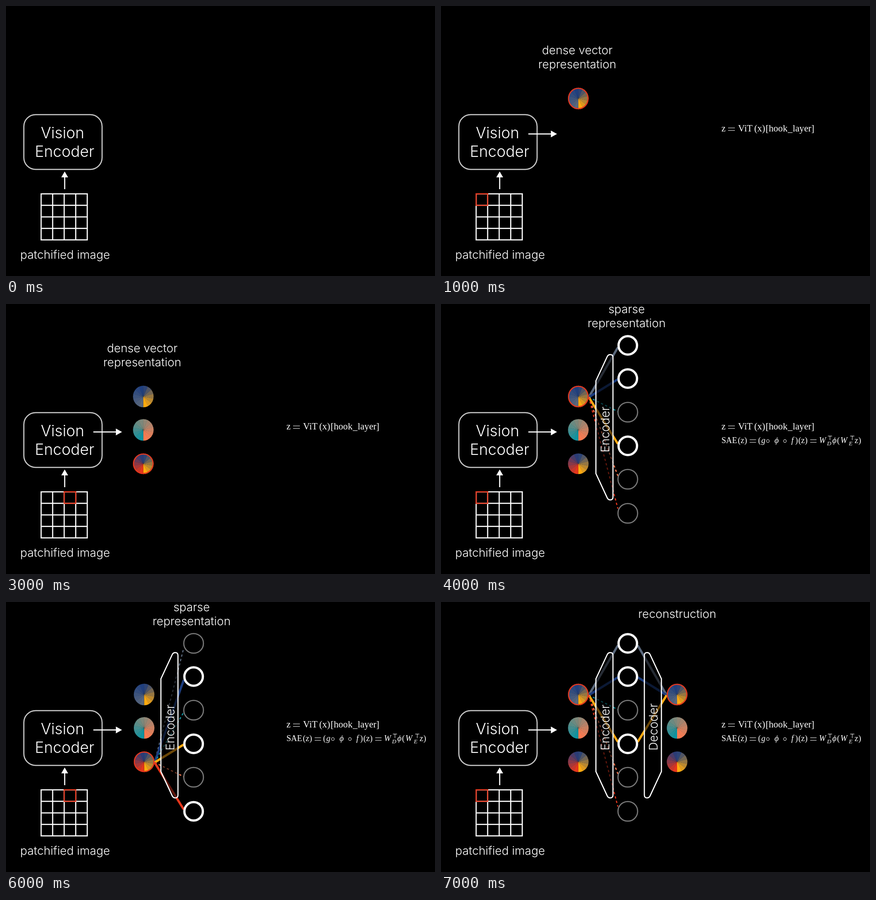
Recreate the animation shown at these times as an HTML page. Size 943 by 594 pixels, loop 8 s.

```html
<!DOCTYPE html>
<html lang="en">
<head>
<meta charset="utf-8">
<title>Sparse autoencoder on vision features</title>
<style>
  html, body { margin: 0; width: 100%; height: 100%; overflow: hidden; background: #000; }
  svg { display: block; width: 100vw; height: 100vh; }
  text { fill: #fff; font-family: Inter, sans-serif; font-weight: 300; font-size: 25.6px;
         font-optical-sizing: none; text-anchor: middle; }
  .big { font-size: 33.7px; }
  .side { font-size: 26px; }
  .math text { font-family: "Liberation Serif", serif; font-weight: 400; text-anchor: start; }
  .math .l1 { font-size: 20.6px; }
  .math .l2 { font-size: 18.2px; }
  .math .sub { font-size: 13px; }
  .math .it { font-style: italic; }
  .line { fill: none; stroke: #fff; stroke-width: 2.5; }
</style>
</head>
<body>
<svg id="stage" viewBox="0 0 943 594" xmlns="http://www.w3.org/2000/svg"></svg>
<script>
const STEP = 1000, COUNT = 8;
const SLATE = [90, 104, 124], BLUE = [27, 60, 126], TEAL = [15, 147, 160],
      GOLD = [255, 170, 15], CORAL = [255, 123, 80], RED = [229, 54, 28];
const rgb = c => `rgb(${c.map(Math.round)})`;

const features = [SLATE, BLUE, TEAL, GOLD, CORAL, RED];
const nodeY = [91, 164, 238, 312, 385.5, 460.5];
const tokens = [
  { y: 203.5, ry: 23.8, stops: [GOLD, BLUE, SLATE], on: [0, 1, 3] },
  { y: 277, ry: 23.8, stops: [CORAL, TEAL], on: [2, 4] },
  { y: 351.5, ry: 22.7, stops: [GOLD, BLUE, RED], on: [1, 3, 5] }
];
const TOKEN_X = 301.8, NODE_X = 410.6, OUT_X = 519, RX = 22.7, WEDGES = 14;

const label = (s, x, y, cls = '') => `<text class="${cls}" x="${x}" y="${y}">${s}</text>`;
const path = (d, extra = '') => `<path class="line" d="${d}" ${extra}/>`;

function mix(stops, u) {
  const p = u * (stops.length - 1), i = Math.min(Math.floor(p), stops.length - 2);
  return rgb(stops[i].map((a, k) => a + (stops[i + 1][k] - a) * (p - i)));
}

// Angular gradient in flat wedges, from the bottom up the right side.
function disc(x, t, ringed) {
  const at = a => `${x + RX * Math.sin(a)} ${t.y + t.ry * Math.cos(a)}`;
  let out = '';
  for (let i = 0; i < WEDGES; i++) {
    const a = i / WEDGES * 2 * Math.PI;
    const b = Math.min((i + 1.06) / WEDGES, 1) * 2 * Math.PI;
    out += `<path fill="${mix(t.stops, i / (WEDGES - 1))}" d="M${x} ${t.y}L${at(a)}A${RX} ${t.ry} 0 0 0 ${at(b)}Z"/>`;
  }
  if (ringed) out += `<ellipse cx="${x}" cy="${t.y}" rx="${RX - 1.2}" ry="${t.ry - 1.2}" fill="none" stroke="${rgb(RED)}" stroke-width="2.5"/>`;
  return out;
}

const discs = (x, sel, n = 3) => tokens.slice(0, n).map((t, i) => disc(x, t, i === sel)).join('');

// side = 1 links tokens to nodes, side = -1 links nodes to outputs.
function links(x, nx, sel, side) {
  const t = tokens[sel], y = t.y + 1.5;
  return features.map((c, i) => {
    const on = t.on.includes(i);
    if (!on && side < 0) return '';
    const ny = nodeY[i] + (y - nodeY[i]) * .04;
    const style = on ? 'stroke-width="5"' : 'stroke-width="2.5" stroke-dasharray="5 5"';
    return `<path d="M${x + 23 * side} ${y}L${nx - 21.8 * side} ${ny}" stroke="${rgb(c)}" ${style}/>`;
  }).join('');
}

const nodes = (x, sel) => nodeY.map((y, i) => {
  const on = tokens[sel].on.includes(i);
  return `<circle cx="${x}" cy="${y}" r="${on ? 20.3 : 21.6}" fill="#000" stroke="${on ? '#fff' : '#7a7a7a'}" stroke-width="${on ? 5 : 2.5}"/>`;
}).join('');

const FUNNEL = 'M340.5 169L365.8 114.8Q368 111.2 372 111.2Q378 111.2 378 117.5V424.5Q378 431 372 431Q368 431 365.8 427.4L340.5 373Z';
const funnel = (name, x, flip) =>
  path(FUNNEL, `style="fill:rgba(0,0,0,.58)" ${flip ? 'transform="matrix(-1 0 0 1 825 0)"' : ''}`) +
  `<text class="side" transform="translate(${x} ${flip ? 274.8 : 276}) rotate(-90)">${name}</text>`;

const cell = 25.35, gx = 77.2, gy = 413.2;
function grid(sel) {
  let d = '';
  for (let i = 0; i < 5; i++) {
    d += `M${gx + i * cell} ${gy - 1.2}v${4 * cell + 2.4}M${gx - 1.2} ${gy + i * cell}h${4 * cell + 2.4}`;
  }
  const mark = sel < 0 ? '' :
    `<rect x="${gx + sel * cell}" y="${gy}" width="${cell}" height="${cell}" fill="none" stroke="${rgb(RED)}" stroke-width="2.5"/>`;
  return path(d) + mark;
}

const base = sel =>
  '<rect x="39.2" y="239" width="172" height="120.4" rx="26" fill="none" stroke="#c8c8c8" stroke-width="2.5"/>' +
  label('Vision', 124.3, 291, 'big') + label('Encoder', 128.8, 331.8, 'big') +
  path('M129 403V375') + '<path fill="#fff" d="M121.5 377L129 364L136.5 377Z"/>' +
  grid(sel) + label('patchified image', 130, 556);

const arrow = path('M192 281.5H243') + '<path fill="#fff" d="M241.5 274L255 281.5L241.5 289Z"/>';

// Math is set in pieces: [text, x, classes].
const setLine = (y, cls, parts) => parts.map(([s, x, c = '']) => label(s, x, y, cls + ' ' + c)).join('');
const equals = (x, y, w) => `<path d="M${x} ${y - 2.8}h${w}M${x} ${y + 2.8}h${w}" stroke="#fff"/>`;
const compose = (x, y) => `<circle cx="${x}" cy="${y}" r="3.2" fill="none" stroke="#fff"/>`;
const transpose = x => `<path d="M${x} 290.5h9m-4.5 0v9" stroke="#fff" fill="none"/>`;

const formula1 = setLine(276, 'l1', [
  ['z', 616.5], ['ViT', 653], ['(x)', 688.5], ['[', 713.5], ['hook', 720.5],
  ['_', 762.3], ['layer', 773], [']', 813.8]
]) + equals(631, 271, 15);

const formula2 = setLine(306, 'l2', [
  ['SAE', 616.5], ['(z)', 652.5], ['(', 697], ['g', 704, 'it'], ['ϕ', 733, 'it'], ['f', 770, 'it'],
  [')', 778.5], ['(z)', 785.5], ['W', 831, 'it'], ['ϕ', 860, 'it'], ['(', 870.5],
  ['W', 878, 'it'], ['z', 909], [')', 917.5]
]) + setLine(310.5, 'sub it', [['D', 848.5], ['E', 896.5]]) +
  equals(678.5, 301.5, 14) + equals(811.5, 301.5, 14) +
  compose(718.5, 301.5) + compose(756, 301.5) + transpose(850.5) + transpose(899.5);

function scene(step) {
  if (step === 0) return base(-1);
  const sel = (step - 1) % 3;
  let out = base(sel) + arrow;
  if (step < 4) {
    return out + label('dense vector', 299.5, 106.4) + label('representation', 299.5, 136.8) +
      discs(TOKEN_X, sel, step) + `<g class="math">${formula1}</g>`;
  }
  const x = TOKEN_X + sel * .9, nx = NODE_X + sel * .9, decode = step === 7;
  out += links(x, nx, sel, 1);
  if (decode) out += links(OUT_X, nx, sel, -1);
  out += discs(x, sel) + nodes(nx, sel) + funnel('Encoder', 370, false);
  out += decode
    ? discs(OUT_X, sel) + funnel('Decoder', 476, true) + label('reconstruction', 519.3, 35.4)
    : label('sparse', 408, 20.4) + label('representation', 408, 50.8);
  return out + `<g class="math">${formula1}${formula2}</g>`;
}

const svg = document.getElementById('stage');
const begin = performance.now();
let shown = -1;
function draw(now) {
  const step = Math.floor(Math.max(0, now - begin) / STEP) % COUNT;
  if (step !== shown) svg.innerHTML = scene(shown = step);
  requestAnimationFrame(draw);
}
draw(begin);
</script>
</body>
</html>
```
